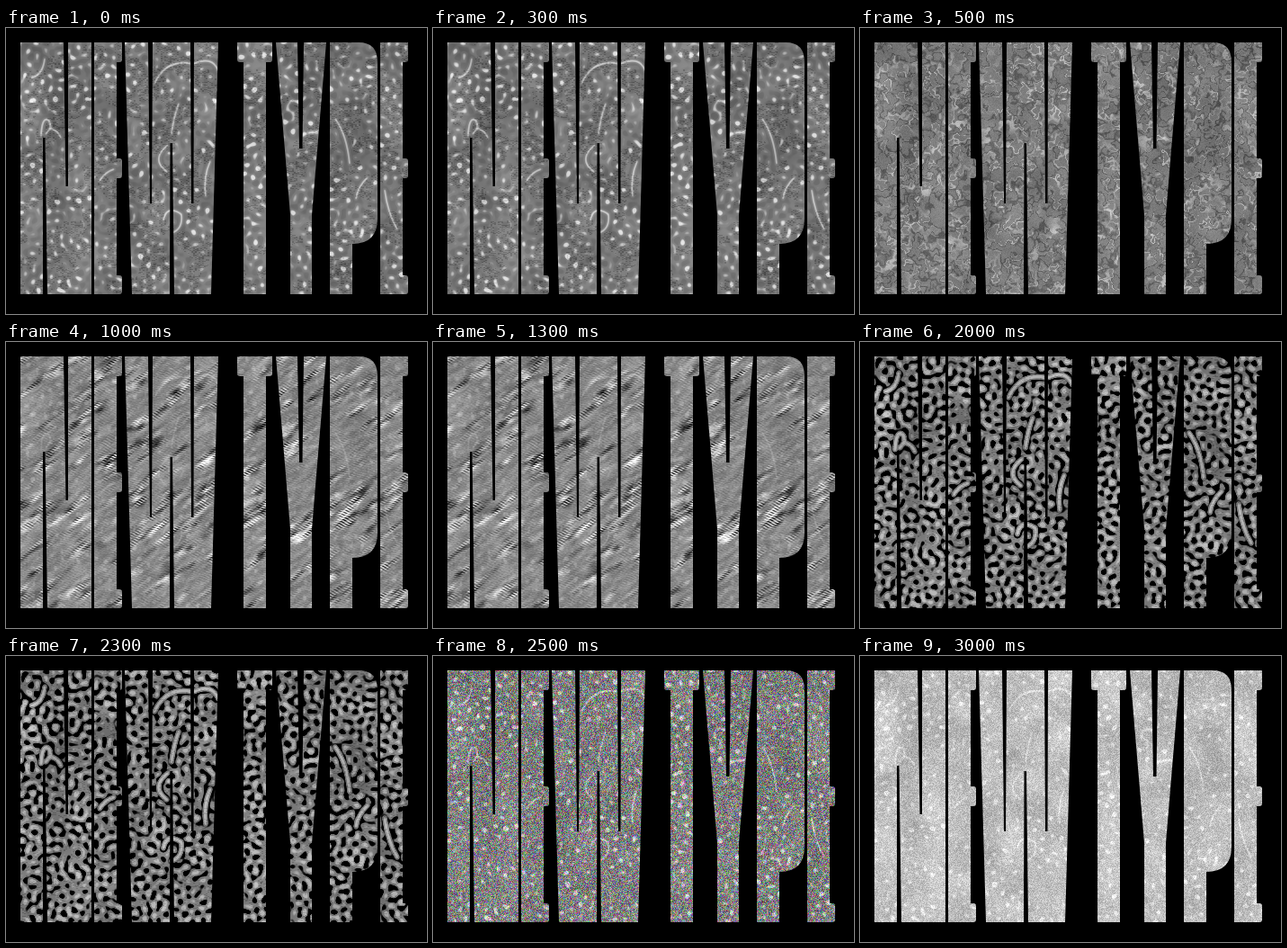
These frames come from a looping animation (468 px wide and 318 px high, 3500 ms). An HTML page with a canvas:

```html
<!DOCTYPE html>
<html lang="en">
<head>
<meta charset="utf-8">
<title>NEW TYPE</title>
<style>
  html, body { margin: 0; width: 100%; height: 100%; overflow: hidden; background: #000; }
  canvas { display: block; width: 468px; height: 318px; }
</style>
</head>
<body>
<canvas id="stage" width="468" height="318" role="img" aria-label="NEW TYPE"></canvas>
<script>
const W = 468, H = 318, HOLD = 500;
const stage = document.getElementById('stage').getContext('2d');

// Lettering
const letterE = x => `M${x} 16h31v19q0 3-3 3h-3v107h3q3 0 3 3v16q0 3-3 3h-3v108h3q3 0 3 3v15q0 3-3 3h-28z`;
const letters = new Path2D([
  'M16 16H64L66.5 176H69V16H95V296H46L43.5 122H41V296H16z',
  letterE(98),
  'M132 16H158L160 195H162L163 16H205L206 195H208.5L209 16H236L228 296H187L185 128H182.5L182 296H140z',
  'M257 16H296V35q0 3-3 3H289V296H264V38H260q-3 0-3-3z',
  'M300 16H324L326 134H329.5L331 16H356L340 208V296H316V208z',
  'M360 16H392Q413 16 413 38V212Q413 240 385 240V296H360z',
  letterE(416)
].join(''));

// Seeded noise
function hash(x, y, seed) {
  let h = Math.imul(x, 374761393) ^ Math.imul(y, 668265263) ^ Math.imul(seed + 1, 1442695041);
  h = Math.imul(h ^ (h >>> 13), 1274126177);
  h = Math.imul(h ^ (h >>> 15), 2246822519);
  return ((h ^ (h >>> 16)) >>> 0) / 2 ** 32;
}
const mix = (a, b, k) => a + (b - a) * k;
const ease = k => k * k * (3 - 2 * k);
const step = (a, b, v) => ease(Math.min(1, Math.max(0, (v - a) / (b - a))));
function noise(x, y, seed) {
  const i = Math.floor(x), j = Math.floor(y), u = ease(x - i), v = ease(y - j);
  return mix(mix(hash(i, j, seed), hash(i + 1, j, seed), u),
             mix(hash(i, j + 1, seed), hash(i + 1, j + 1, seed), u), v);
}

function layer() {
  const c = document.createElement('canvas');
  c.width = W;
  c.height = H;
  return c.getContext('2d', { willReadFrequently: true });
}

// Bold curled fibres that several textures share
const fibres = new Path2D([
  'M39 120Q40 98 47 102Q53 109 44 118', 'M50 112Q58 114 61 122', 'M366 101Q379 119 382 151',
  'M389 190Q391 176 402 166', 'M180 130Q160 146 179 160', 'M165 62Q178 33 208 40Q230 30 236 48',
  'M184 118Q186 100 192 84', 'M227 148Q219 166 222 187', 'M28 55Q41 53 43 34',
  'M421 180Q424 205 435 224', 'M175 214Q178 196 195 207Q197 224 184 228', 'M104 170Q110 160 120 157'
].join(''));
function fibreField(width, blur) {
  const ctx = layer();
  ctx.filter = `blur(${blur}px)`;
  ctx.lineWidth = width;
  ctx.lineCap = ctx.lineJoin = 'round';
  ctx.stroke(fibres);
  const { data } = ctx.getImageData(0, 0, W, H);
  return i => data[i * 4 + 3] / 255;
}

// Plane waves of similar length in all directions add up to a labyrinth of worms
const waves = Array.from({ length: 20 }, (_, i) => {
  const angle = (i + hash(i, 0, 22)) * Math.PI / 20;
  const k = 2 * Math.PI / (8.5 + 4 * hash(i, 1, 22));
  return { kx: k * Math.cos(angle), ky: k * Math.sin(angle), phase: 2 * Math.PI * hash(i, 2, 22) };
});
const thin = fibreField(3.5, 1), wide = fibreField(10, 1.5);
const field = Float32Array.from({ length: W * H }, (_, i) => {
  const x = i % W, y = Math.floor(i / W);
  let sum = 0;
  for (const { kx, ky, phase } of waves) sum += Math.cos(kx * x + ky * y + phase);
  const patch = .5 + .9 * noise(x / 16, y / 16, 3);
  return sum / Math.sqrt(10) * patch * (1 - wide(i)) + 3.4 * thin(i) - 1.2 * wide(i);
});
const labyrinth = (x, y) => field[y * W + x];
const ridge = (x, y) => step(.6, 2.4, labyrinth(x, y));

const glow = (x, y, cx, cy, r) => Math.exp(-((x - cx) ** 2 + (y - cy) ** 2) / (r * r));
const cloud = (x, y) =>
  noise(x / 28, y / 28, 1) * .7 + noise(x / 9, y / 9, 2) * .3 - .5 +
  .4 * (glow(x, y, 318, 130, 11) + glow(x, y, 228, 95, 14));
const grain = (x, y, seed) => hash(x, y, seed) - .5;

// Each texture gives a grey level or an [r, g, b] triple
function worms(x, y) {
  const speck = noise(x / 13, y / 13, 4) > .5 && hash(x >> 1, y, 5) > .7 ? 22 : 0;
  return 124 + 45 * cloud(x, y) + 95 * ridge(x, y) - 14 * step(.2, -1, labyrinth(x, y)) - speck;
}

function crackle(x, y) {
  const wx = x + 7 * noise(x / 4, y / 4, 6), wy = y + 7 * noise(x / 4, y / 4, 7);
  const n = noise(wx / 6, wy / 6, 8);
  const line = level => 1 - step(.02, .1, Math.abs(n - level));
  const light = noise(x / 12, y / 12, 10);
  return 124 + 40 * cloud(x, y) + 75 * line(.66) * light - 42 * line(.4) * (1 - light * .5)
    + 16 * grain(x, y, 11);
}

function streaks(x, y) {
  const sx = x + (y % 2 ? 1.5 : -1.5);
  const along = sx * .77 - y * .64, across = sx * .64 + y * .77;
  const n = noise(along / 11, across / 1.8, 12) - .5;
  const force = 45 + 210 * step(.5, .9, noise(along / 28, across / 7, 13));
  return 136 + 25 * cloud(x, y) + n * force + 26 * ridge(x, y) + 20 * grain(x >> 1, y, 14);
}

function weave(x, y) {
  const dash = noise(x / 7, y, 15) - .5;
  const row = (y % 3 === 0 ? -10 : 4) * noise(x / 18, y / 10, 16);
  return 122 + 75 * cloud(x, y) + 38 * dash + row + 10 * ridge(x, y);
}

function maze(x, y) {
  const worm = labyrinth(x, y);
  const speck = hash(x >> 1, y, 17) > .82 ? 22 : 0;
  return (122 + 55 * cloud(x, y) + 55 * step(.3, 1.4, worm) - speck) * step(-.85, -.3, worm);
}

function colourNoise(x, y) {
  const base = 126 + 30 * cloud(x, y) + 75 * ridge(x, y);
  return [18, 19, 20].map(seed => base + 140 * grain(x, y, seed));
}

const frost = (x, y) =>
  190 + 50 * cloud(x, y) + 42 * ridge(x, y) + 52 * grain(x, y, 21);

function render(texture) {
  const ctx = layer(), image = ctx.createImageData(W, H);
  for (let y = 16; y < 297; y++) {
    for (let x = 15; x < 449; x++) {
      const p = (y * W + x) * 4, v = texture(x, y);
      for (let c = 0; c < 3; c++) image.data[p + c] = v.length ? v[c] : v;
      image.data[p + 3] = 255;
    }
  }
  ctx.putImageData(image, 0, 0);
  ctx.globalCompositeOperation = 'destination-in';
  ctx.fill(letters);
  return ctx.canvas;
}

const pictures = [worms, crackle, streaks, weave, maze, colourNoise, frost].map(render);

function draw() {
  const index = Math.floor(performance.now() / HOLD) % pictures.length;
  stage.fillRect(0, 0, W, H);
  stage.drawImage(pictures[index], 0, 0);
  requestAnimationFrame(draw);
}
draw();
</script>
</body>
</html>
```
